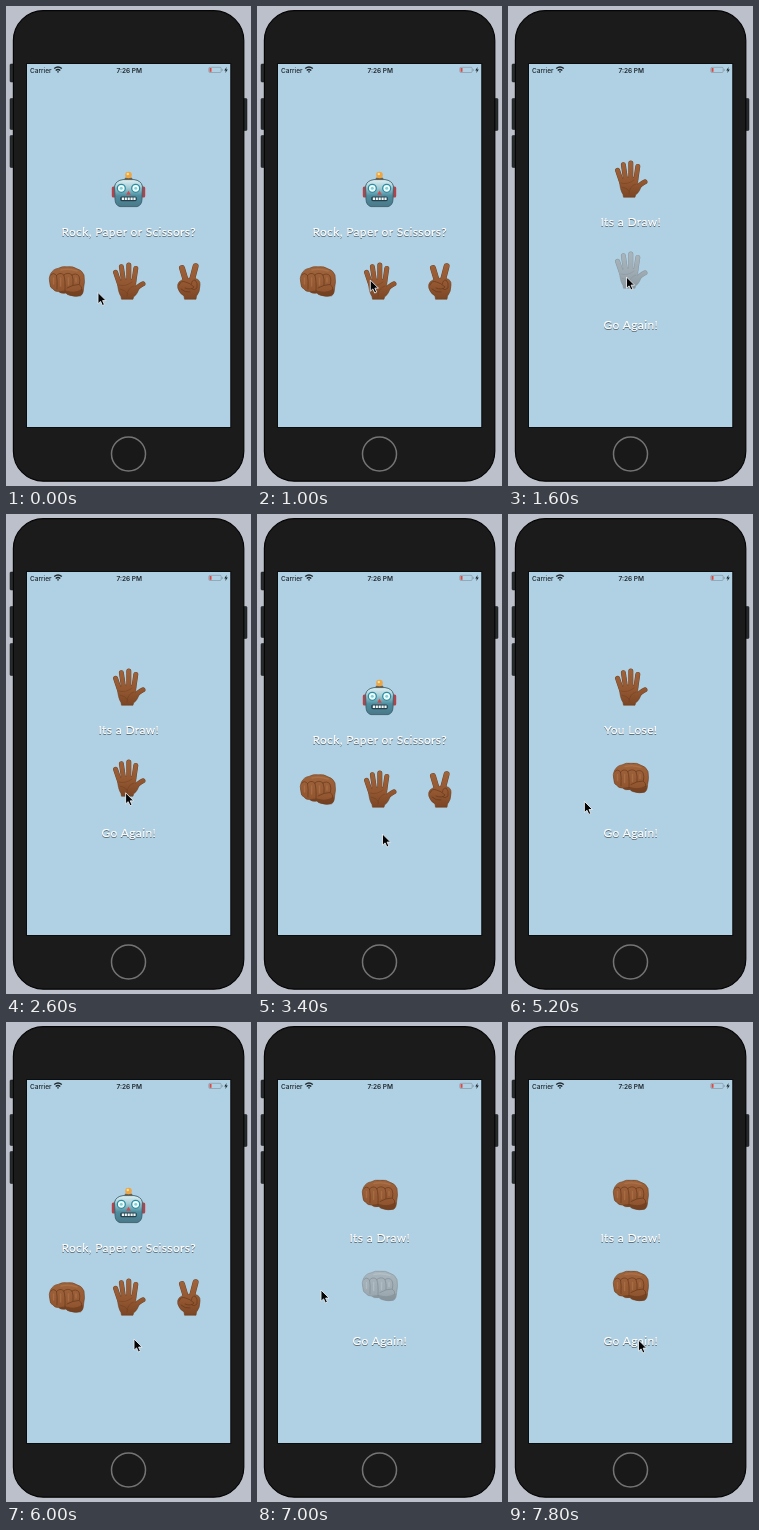
An HTML page for the animation above (8 s loop, 245 px wide and 480 px high).

```html
<!DOCTYPE html>
<html lang="en">
<head>
<meta charset="utf-8">
<title>Rock, Paper or Scissors</title>
<style>
html, body { margin: 0; width: 100%; height: 100%; overflow: hidden; background: #bcc0ca; }
svg { display: block; width: 100%; height: 100%; }
.status { font: 500 6.5px Inter, sans-serif; fill: #1d262c; }
.clock { font-weight: 600; }
.label { font: 400 12px Lato, sans-serif; letter-spacing: .36px; fill: #fff; stroke: #fff; stroke-width: .2;
  text-anchor: middle; filter: drop-shadow(.7px 1px .5px #00000078); }
.finger-edge, .finger { fill: none; stroke-linecap: round; stroke-linejoin: round; }
.finger-edge { stroke: #70401f; stroke-width: 5; }
.finger { stroke: url(#skin); stroke-width: 4.1; }
.thick .finger-edge { stroke-width: 6; }
.thick .finger { stroke-width: 5; }
.flesh { fill: url(#skin); stroke: #70401f; stroke-width: .6; stroke-linejoin: round; }
.crease { fill: none; stroke: #5f3318; stroke-width: .8; stroke-linecap: round; opacity: .75; }
</style>
</head>
<body>
<svg viewBox="0 0 245 480">
  <defs>
    <linearGradient id="skin" gradientUnits="userSpaceOnUse" x1="0" y1="0" x2="0" y2="38">
      <stop stop-color="#a1653d"/><stop offset=".6" stop-color="#925731"/><stop offset="1" stop-color="#7a4424"/>
    </linearGradient>
    <linearGradient id="metal" x2="0" y2="1">
      <stop stop-color="#deeff2"/><stop offset=".3" stop-color="#a3ccd5"/>
      <stop offset=".6" stop-color="#4d8ea0"/><stop offset="1" stop-color="#4a7888"/>
    </linearGradient>
    <path id="palm-fingers" d="M7.5 22L3.6 10.4M11.5 19L9.4 4.8M16.8 19L16.8 3M21.8 20L23.8 6.4M22 30Q26 24 31 21.8"/>
    <path id="v-fingers" d="M10.5 21L6 6M15.5 20L19.6 4.2"/>

    <g id="paper">
      <use href="#palm-fingers" class="finger-edge"/>
      <path class="flesh" d="M5.4 20Q14 15 23.8 18.5L23.8 25.5L27 24Q27 31 21.5 35L21 37.2H9.5L9 34.5Q6 30 5.4 20Z"/>
      <use href="#palm-fingers" class="finger"/>
      <path class="crease" style="opacity:.4" d="M7 23Q14 25 20 20M22 24Q15 26 15 34M8 27Q13 28 15 31"/>
    </g>

    <g id="rock">
      <path class="flesh" d="M1.5 8Q4 3 9 2.4Q13 0 18 .8Q24 0 28 2.8Q33 4 35 9Q36.2 16 34.6 22Q34.5 28 31.5 29.8Q26 31 20.5 29.2Q17.5 28.5 17 27Q12 28 9.5 25.6Q5.5 25.6 4 23Q.8 22 .8 17Q-.6 12 1.5 8Z"/>
      <path d="M9.5 25.6Q17 24 19 25Q27 27 33 23L34 26Q33 30 28 30.4Q20 30.4 17 27Q12 28 9.5 25.6Z" fill="#65371b" opacity=".6"/>
      <path class="crease" d="M2 9Q4.5 6 7.5 9.5Q8.5 14 8 23M7.5 9.5Q11 5.5 14.8 9Q16.5 14 16 25M14.8 9Q19 5.5 23 9Q24.6 13 24 19M23 9Q27 6.5 30 10Q31.5 14 30.5 18M18 22Q24 18.5 30 18.5Q33 20 33 24"/>
      <path d="M4.5 12V18M11.6 12V20M19.5 12V19M27 12V16M12 4Q20 2 28 5" fill="none" stroke="#b67c51" stroke-width="1.5" stroke-linecap="round" opacity=".5"/>
    </g>

    <g id="scissors" class="thick">
      <use href="#v-fingers" class="finger-edge"/>
      <path class="flesh" d="M3.5 19.5Q9 15 19 16.5Q24.5 17.5 24 23Q24 30 20.5 34L20 37.2H8.5L8 34Q3 31 1.8 26Q1 22 3.5 19.5Z"/>
      <use href="#v-fingers" class="finger"/>
      <path class="crease" d="M3 23Q5 18 9.5 20Q14 21 18 25Q15 28.5 9 26M15.5 22Q15.5 18 19 18Q22 20 21 26Q18 29 16 27M5 27Q9 31 14 30"/>
    </g>

    <g id="robot">
      <rect x="11.5" y="6.5" width="8" height="4" rx="1.5" fill="#7b5b3c"/>
      <circle cx="15.5" cy="4" r="3.3" fill="#eba645"/>
      <circle cx="14.8" cy="3" r="1.2" fill="#ffe09a"/>
      <rect x="-1.2" y="15.5" width="4" height="11" rx="1.5" fill="#b0444a"/>
      <rect x="28.2" y="15.5" width="4" height="11" rx="1.5" fill="#b0444a"/>
      <path d="M1.6 15Q3 9.5 10 8.6H21Q28 9.5 29.4 15L29 28Q28.8 34.5 24 35.6H7Q2.2 34.5 2 28Z" fill="url(#metal)" stroke="#3c5f6d" stroke-width=".9"/>
      <g fill="#f2ffff" stroke="#2c8ba0" stroke-width="1.3">
        <circle cx="8.3" cy="17.3" r="4"/><circle cx="22.7" cy="17.3" r="4"/>
      </g>
      <g fill="#82cfd8"><circle cx="8.3" cy="17.3" r="1.5"/><circle cx="22.7" cy="17.3" r="1.5"/></g>
      <path d="M15.5 19.8L17.8 23.8H13.2Z" fill="#d6474a"/>
      <rect x="7.2" y="25.4" width="16.6" height="4.8" rx="1.6" fill="#24404c"/>
      <path d="M8.8 27.8H22.6" stroke="#f3f8f7" stroke-width="2.6" stroke-dasharray="2.2 .7"/>
    </g>
  </defs>

  <rect width="245" height="480" fill="#bcc0ca"/>
  <g fill="#272c2e" stroke="#111" stroke-width=".5">
    <rect x="4" y="58" width="6" height="18" rx="1"/>
    <rect x="4" y="92.5" width="6" height="31" rx="1"/>
    <rect x="4" y="129.5" width="6" height="32" rx="1"/>
    <rect x="235" y="92.5" width="6" height="32" rx="1"/>
  </g>
  <rect x="7.4" y="4.6" width="230.4" height="470.6" rx="30" fill="#1b1b1b" stroke="#050505" stroke-width="1.2"/>
  <circle cx="122.5" cy="448" r="17" fill="#191919" stroke="#747474" stroke-width="1.5"/>
  <rect x="20.5" y="57.5" width="204.3" height="364" fill="#b0d0e3" stroke="#0b0d0f"/>

  <text class="status" x="24" y="66.5">Carrier</text>
  <path d="M48.2 62.6Q52 59.4 55.8 62.6M49.7 64.4Q52 62.6 54.3 64.4M51.2 65.9H52.8" fill="none" stroke="#1d262c" stroke-width="1.3"/>
  <text class="status clock" x="123.2" y="66.5" text-anchor="middle">7:26 PM</text>
  <rect x="202.8" y="61.3" width="12.4" height="5.2" rx="1.2" fill="none" stroke="#8799a5" stroke-width=".7"/>
  <path d="M216.2 63V65" stroke="#8799a5" stroke-width=".8"/>
  <rect x="203.6" y="62" width="1.9" height="3.8" fill="#e0483f"/>
  <path d="M220.6 61L218.3 64.4H219.8L219.3 67L221.8 63.5H220.2Z" fill="#1d262c"/>

  <g id="menu">
    <use href="#robot" x="107" y="165"/>
    <text class="label" x="122.7" y="230">Rock, Paper or Scissors?</text>
    <use href="#rock" x="43" y="260"/>
    <use href="#paper" x="106" y="256"/>
    <use href="#scissors" x="170" y="256"/>
  </g>
  <g id="result">
    <use id="robotHand"/>
    <text id="verdict" class="label" x="122.8" y="219.5"></text>
    <use id="playerHand"/>
    <text class="label" x="122.8" y="323">Go Again!</text>
  </g>
  <path id="cursor" d="M0 0V11.2L2.6 8.9L4.4 13L6.4 12.1L4.6 8.1H8.1Z" fill="#050505" stroke="#e8eef2" stroke-width=".9" stroke-linejoin="round"/>
</svg>
<script>
const LOOP = 8000;
const rounds = [
  { start: 1500, end: 3250, robot: 'paper', player: 'paper', verdict: 'Its a Draw!' },
  { start: 4300, end: 5850, robot: 'paper', player: 'rock', verdict: 'You Lose!' },
  { start: 6900, end: 8000, robot: 'rock', player: 'rock', verdict: 'Its a Draw!' },
];
// Pointer stops: [time, x, y]
const stops = [
  [0, 92, 286.5], [500, 92, 286.5], [1200, 118.5, 271], [2450, 118.5, 271],
  [3050, 125.5, 320], [3600, 125.5, 320], [4200, 63.5, 280], [5000, 63.5, 280],
  [5700, 128, 317], [6150, 128, 317], [6750, 64, 268], [7250, 64, 268],
  [7700, 130.5, 318], [8000, 130.5, 318],
];
const handOffset = { paper: [106, 154], rock: [105, 157.5] };
const byId = id => document.getElementById(id);
const [menu, result, robotHand, playerHand, verdict, cursor] =
  ['menu', 'result', 'robotHand', 'playerHand', 'verdict', 'cursor'].map(byId);

const clamp = v => Math.min(1, Math.max(0, v));
const ease = v => v * v * (3 - 2 * v);
const mix = (a, b, k) => a + (b - a) * k;

function placeHand(node, name, dy) {
  const [x, y] = handOffset[name];
  node.setAttribute('href', '#' + name);
  node.setAttribute('x', x);
  node.setAttribute('y', y + dy);
}

function draw(t) {
  const round = rounds.find(r => t >= r.start && t < r.end);
  menu.style.display = round ? 'none' : '';
  result.style.display = round ? '' : 'none';
  if (round) {
    placeHand(robotHand, round.robot, 0);
    placeHand(playerHand, round.player, 91);
    verdict.textContent = round.verdict;
    const shown = clamp((t - round.start - 150) / 300);
    playerHand.style.opacity = mix(.6, 1, shown);
    playerHand.style.filter = `grayscale(${1 - shown}) brightness(${mix(1.5, 1, shown)})`;
  }
  const next = Math.max(1, stops.findIndex(s => s[0] > t));
  const [t0, x0, y0] = stops[next - 1], [t1, x1, y1] = stops[next];
  const k = ease((t - t0) / (t1 - t0));
  cursor.setAttribute('transform', `translate(${mix(x0, x1, k)} ${mix(y0, y1, k)})`);
}

function tick() {
  draw(performance.now() % LOOP);
  requestAnimationFrame(tick);
}
tick();
</script>
</body>
</html>
```
